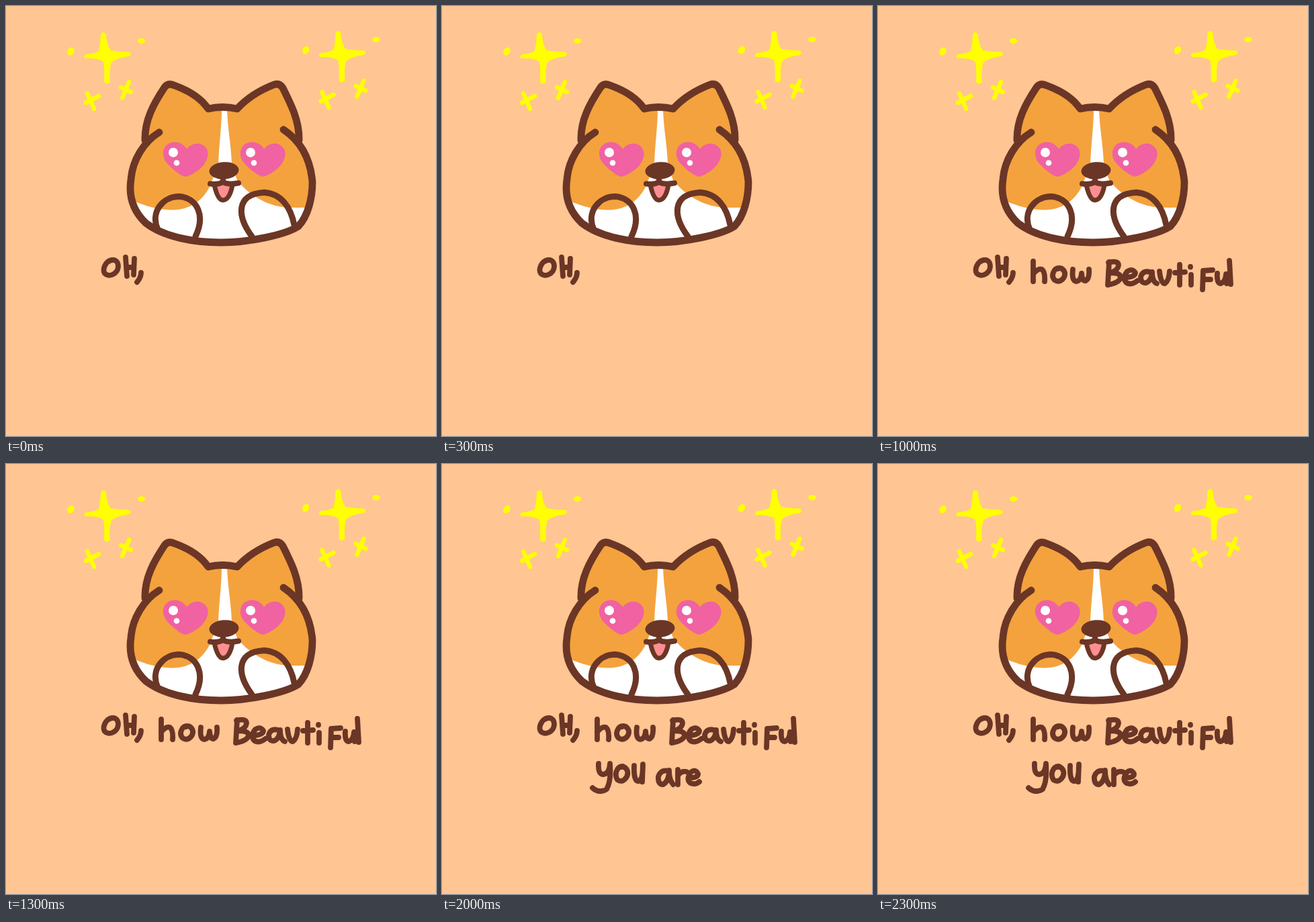
An HTML page that plays this animation: 640 px wide and 640 px high, repeating every 2.5 s.

```html
<!DOCTYPE html>
<html lang="en">
<head>
<meta charset="utf-8">
<title>Oh, how beautiful you are</title>
<style>
  html, body { margin: 0; width: 100%; height: 100%; overflow: hidden; background: #ffc593; }
  svg { display: block; width: 100vw; height: 100vh; }
  .line { fill: none; stroke: #6b3626; stroke-width: 10.8; stroke-linecap: round; stroke-linejoin: round; }
  .paw { stroke-width: 9; }
  .down .paw { fill: #fff; }
  .word { stroke-width: 7.8; }
  .cross { fill: none; stroke: #ff0; stroke-width: 6.5; stroke-linecap: round; }
</style>
</head>
<body>
<svg viewBox="0 0 640 640">
  <defs>
    <path id="ears" d="M207 200C206 170 220 145 236 121Q241 114 250 118C270 125 290 137 301 153Q322 148 344 153C358 138 378 125 399 117Q407 114 412 122C425 148 437 172 436 200"/>
    <path id="face" d="M228 188C205 202 188 230 186 258C182 285 190 306 208 323C235 344 280 352 320 352C360 352 415 341 435 328C450 312 456 285 456 262C453 226 437 200 413 184"/>
    <clipPath id="inside"><use href="#face"/></clipPath>
    <g id="eye">
      <path fill="#f062a2" d="M269 213C276 203 292 201 299 213C304 224 296 238 284 246Q272 254 266 254C258 251 246 242 238 232C230 220 234 206 247 203C257 201 265 206 269 213"/>
      <circle cx="249" cy="218" r="7" fill="#fff"/>
      <circle cx="254" cy="233.5" r="4.3" fill="#fff"/>
    </g>
    <g id="sparkle" fill="#ff0">
      <path d="M141 42Q145 36 149 42C149 52 152 60 156 66Q170 68 184 68.500Q188 72 183 75Q165 77 157 84Q153 95 155 113Q150.500 119 146 113Q147 95 145 83Q135 77 118 78Q114 75 119 72Q132 71 138 67Q141 55 141 42Z"/>
      <ellipse cx="96.500" cy="67.500" rx="4.800" ry="6.300" transform="rotate(30 96.500 67.500)"/>
      <ellipse cx="201.500" cy="52" rx="5.800" ry="4"/>
      <path class="cross" d="M121 130L131 153M119 144L138 134M183 113L173 137M171 121L186 128"/>
    </g>
  </defs>

  <g id="sparkles"><use href="#sparkle"/><use id="rightSparkle" href="#sparkle"/></g>

  <g class="down">
    <path class="line paw" d="M218 338C215 350 222 362 240 366C258 368 272 358 272 350"/>
    <path class="line paw" d="M367 355C366 372 385 378 405 376C425 373 434 358 430 338"/>
  </g>

  <g fill="#f4a23d"><use href="#ears"/><use href="#face"/></g>
  <path fill="#fff" d="M321 154H329C330 185 335 205 336 236L345 262H306L316 236C317 205 321 180 321 154"/>
  <path fill="#fff" clip-path="url(#inside)" d="M180 286C215 302 240 306 262 302C285 297 300 280 308 258H343C360 280 385 295 410 299C430 301 445 300 470 299V370H180Z"/>
  <use href="#eye"/><use href="#eye" x="115"/>

  <g class="up">
    <path class="line paw" d="M226 333C214 306 234 283.500 258 283.500C285 286 297 312 282 343"/>
    <path class="line paw" d="M366 343C345 315 340 280 384 277.500C410 279 424 300 429 326"/>
    <path class="line" style="fill:#fd8f91;stroke-width:7" d="M310 266C313 280 317 289 323 289C330 289 335 279 337 266"/>
  </g>
  <use class="line" href="#ears"/><use class="line" href="#face"/>
  <ellipse cx="324.500" cy="245" rx="22" ry="12.800" fill="#6b3626" transform="rotate(-4 324.500 245)"/>
  <path class="line" style="stroke-width:8" d="M304 264.500Q315 266.500 323 262Q331 266.500 346 263.500M323 254V261"/>

  <g id="words" class="line word">
    <path aria-label="OH," d="M157 378C148 380 143 392 147 398C152 404 166 400 167 388C167 378 160 376 153 380M178 374L180 402M191 376L190 400M180 389H190M201 397Q201 404 195 411"/>
    <path aria-label="how" d="M231 380V410M231 399Q238 390 244 392Q249 396 248 410M270 390C261 390 257 402 263 408C271 413 279 405 278 397C276 391 272 389 268 391M290 392Q288 409 295 410Q302 409 303 398Q304 410 309 409Q315 406 314 392"/>
    <path aria-label="Beautiful" d="M344 381L342 415M343 382Q358 378 358 386Q357 394 346 397Q362 397 361 405Q358 412 343 415M369 404Q383 403 383 397Q379 390 371 395Q363 405 370 412Q377 416 386 409M405 396Q394 393 391 403Q391 413 399 412Q407 409 408 396Q408 410 415 413M419 395Q421 413 427 413Q433 409 434 395M449 385V415M442 397L457 396M466 400V415M465 388V388.500M484 394L483 422M484 394L498 393M484 407H495M505 398Q504 413 510 413Q517 411 518 399L519 413M523 379L525 414"/>
    <path aria-label="you" d="M233 446Q232 462 240 462Q249 461 250 446Q252 472 245 484Q234 491 224 482M269 450C260 450 256 462 261 470C269 476 278 466 276 457C274 452 271 450 267 451M286 449Q285 473 293 472Q299 469 299 447L298 473"/>
    <path aria-label="are" d="M337 457Q326 454 322 465Q321 477 329 477Q338 472 338 456Q338 470 344 477M351 455V477M351 464Q356 456 364 458M368 467Q382 467 381 461Q377 453 370 459Q363 470 370 475Q377 478 383 473"/>
  </g>
</svg>
<script>
  const BEAT = 500;
  const find = selector => document.querySelector(selector);
  const words = [...find('#words').children];
  const show = (element, on) => { element.style.display = on ? '' : 'none'; };
  const move = (element, x, y) => element.setAttribute('transform', `translate(${x} ${y})`);

  function draw(time) {
    const beat = Math.floor(time / BEAT) % words.length;
    const cheering = beat % 2 === 0;
    show(find('.up'), cheering);
    show(find('.down'), !cheering);
    move(find('#sparkles'), cheering ? 0 : 0.5, cheering ? 0 : 39);
    move(find('#rightSparkle'), cheering ? 349.5 : 346, cheering ? -2 : 0);
    words.forEach((word, i) => show(word, i <= beat));
  }

  const start = performance.now();
  function tick(now) {
    draw(Math.max(0, now - start));
    requestAnimationFrame(tick);
  }
  draw(0);
  requestAnimationFrame(tick);
</script>
</body>
</html>
```
